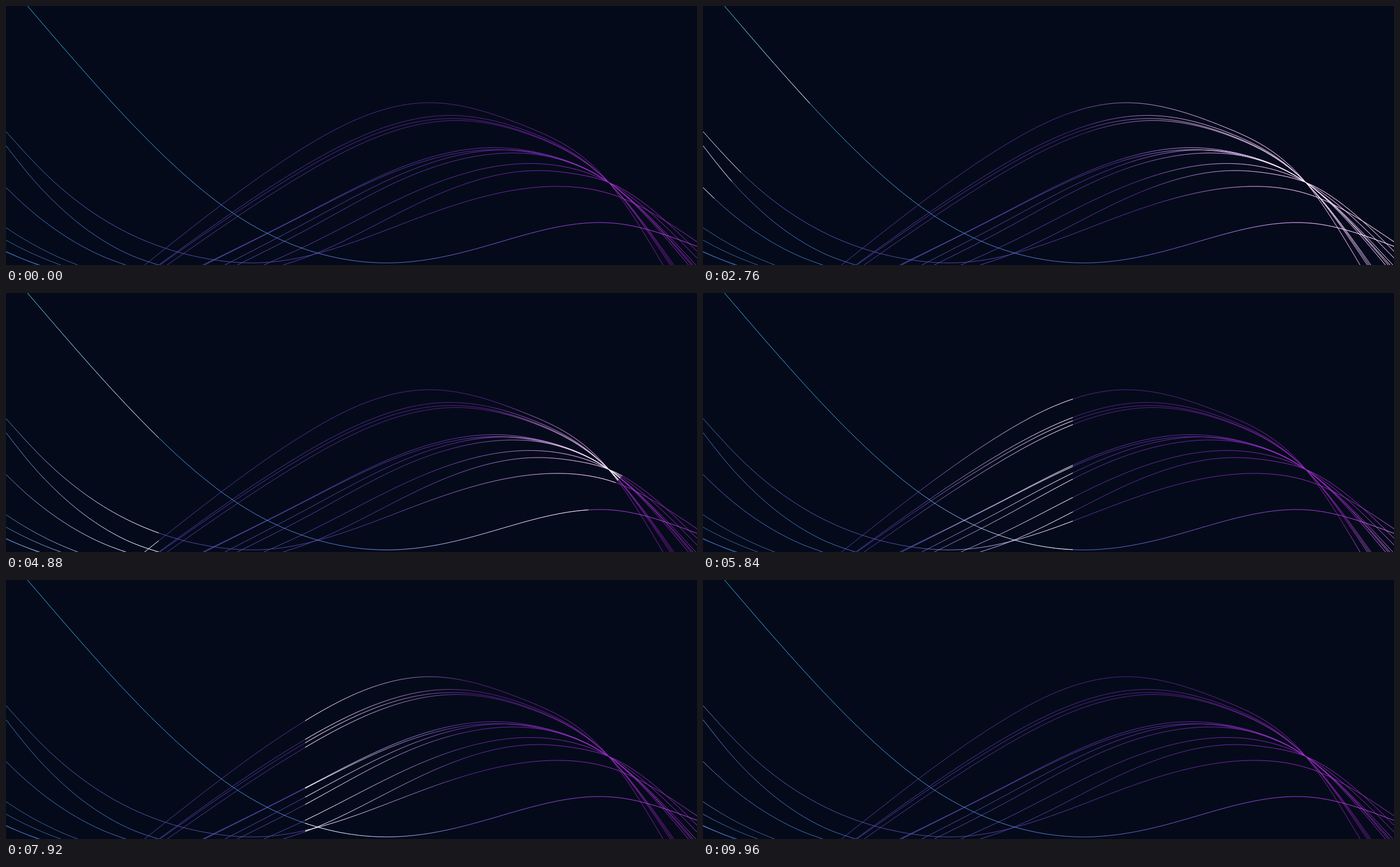
Write an HTML page that moves like this. It is 1222x458 px and loops after 10000 ms.

```html
<!DOCTYPE html>
<html lang="en">
<head>
<meta charset="utf-8">
<title>Light waves</title>
<style>
  html, body { margin: 0; width: 100%; height: 100%; overflow: hidden; background: #050a1a; }
  svg { display: block; width: 100%; height: 100%; }
  path { fill: none; stroke-width: 1; }
</style>
</head>
<body>
<svg id="stage" viewBox="0 0 1222 458" preserveAspectRatio="none"></svg>
<script>
const NS = 'http://www.w3.org/2000/svg';
const LOOP = 10000;
const W = 1222, H = 458;
const stage = document.getElementById('stage');

function add(parent, tag, attrs) {
  const el = document.createElementNS(NS, tag);
  for (const k in attrs) el.setAttribute(k, attrs[k]);
  parent.appendChild(el);
  return el;
}

// Natural cubic spline y(x) through points, written as Bezier segments
function spline(pts) {
  const n = pts.length - 1;
  const h = [], d = [], u = [0], z = [0], c = [];
  for (let i = 0; i < n; i++) {
    h[i] = pts[i + 1][0] - pts[i][0];
    d[i] = (pts[i + 1][1] - pts[i][1]) / h[i];
  }
  for (let i = 1; i < n; i++) {
    const l = 2 * (h[i - 1] + h[i]) - h[i - 1] * u[i - 1];
    u[i] = h[i] / l;
    z[i] = (6 * (d[i] - d[i - 1]) - h[i - 1] * z[i - 1]) / l;
  }
  c[n] = 0;
  for (let i = n - 1; i >= 0; i--) c[i] = i ? z[i] - u[i] * c[i + 1] : 0;

  let path = 'M' + pts[0];
  for (let i = 0; i < n; i++) {
    const [x0, y0] = pts[i], [x1, y1] = pts[i + 1], k = h[i] / 3;
    const m0 = d[i] - h[i] * (2 * c[i] + c[i + 1]) / 6;
    const m1 = d[i] + h[i] * (c[i] + 2 * c[i + 1]) / 6;
    path += 'C' + [x0 + k, y0 + m0 * k, x1 - k, y1 - m1 * k, x1, y1].map(v => v.toFixed(2));
  }
  return path;
}

// Rises from the floor, rounds its peak, falls through a pinch shared by all arches
const PINCH = [1066, 312];
function arch({ from, rise, shoulder, peak: [px, py], to }) {
  const run = (PINCH[0] - px) * 0.55;
  return [
    [from, H], [529, rise], [shoulder, shoulder - 380], [px, py],
    [px + run, py + 0.0014 * run * run], PINCH, [to, H]
  ];
}

// Power curve from the left edge down to the floor at x = exit, towards a hidden valley
function slope(top, exit, valley) {
  const fall = x => ((valley - x) / valley) ** 2.3;
  const r = fall(exit);
  const floor = (H - top * r) / (1 - r);
  return Array.from({ length: 7 }, (_, i) => {
    const x = exit * i / 6;
    return [x, floor - (floor - top) * fall(x)];
  });
}

const tall = [
  { from: 245, rise: 249, shoulder: 593, peak: [747, 171], to: 1162 },
  { from: 270, rise: 282, shoulder: 616, peak: [782, 193.5], to: 1175 },
  { from: 272, rise: 288, shoulder: 620, peak: [788, 199], to: 1178 },
  { from: 285, rise: 296, shoulder: 625, peak: [793, 202.5], to: 1181 }
].map(arch);

const low = [
  { from: 348, rise: 367.5, shoulder: 675, peak: [862, 250.5], to: 1207 },
  { from: 351, rise: 368.5, shoulder: 677, peak: [868, 254], to: 1212 },
  { from: 387, rise: 384, shoulder: 684, peak: [875, 254.5], to: 1215 },
  { from: 409, rise: 397, shoulder: 691, peak: [890, 260], to: 1220 },
  { from: 456, rise: 425, shoulder: 713, peak: [922, 278.5], to: 1234 },
  { from: 490, rise: 445, shoulder: 729, peak: [942, 291], to: 1246 }
].map(arch);

const left = [slope(247, 270, 380), slope(321, 212, 360)];
const corner = [slope(392, 127, 340), slope(414, 97, 320), slope(434, 57, 300), slope(435, 60, 300)];

const bright = [[38, 0], [270, 256], [404, 368], [555, 438], [690, 454], [814, 434], [1075, 384], [W, 425]];
const wave = [[0, 222], [60, 287], [180, 382], [351, 446], [450, 454], [553, 437], [747, 368], [980, 319], [1080, 336], [W, 417]];

const defs = add(stage, 'defs', {});
add(stage, 'rect', { width: W, height: H, fill: '#050a1a' });

function ramp(id, stops) {
  const g = add(defs, 'linearGradient', { id, gradientUnits: 'userSpaceOnUse', x1: 0, y1: 0, x2: W, y2: 0 });
  for (const [x, color] of stops) add(g, 'stop', { offset: x / W, 'stop-color': color });
}
ramp('cyan', [[0, '#2cbcee'], [180, '#30b2ea'], [400, '#4c94de'], [700, '#5a6cc8'], [1070, '#a03ede'], [W, '#c83cf0']]);
ramp('violet', [[0, '#4288d4'], [330, '#5a5cc0'], [750, '#6636b0'], [900, '#7a2cb8'], [1060, '#a830d6'], [W, '#b030d8']]);
ramp('plum', [[230, '#5348b0'], [500, '#56389e'], [750, '#5a2590'], [900, '#6c2298'], [1060, '#9a2ac2'], [1180, '#8a1cae']]);
ramp('blue', [[0, '#3f80cc'], [270, '#4a74c2']]);

let all = '';
function draw(lines, ink, opacity) {
  for (const line of lines) {
    const d = spline(line);
    all += d;
    add(stage, 'path', { d, stroke: `url(#${ink})`, 'stroke-opacity': opacity });
  }
}
draw(tall, 'plum', 0.9);
draw([...low, wave], 'violet', 0.85);
draw(left, 'blue', 0.95);
draw(corner, 'blue', 0.8);
draw([bright], 'cyan', 1);

// Each light sweep travels along (a, b); its sharp edge is a*x + b*y = at + speed * (t - t0)
const sweeps = [
  { a: 1, b: -1, at: 380, t0: 1840, speed: 0.463, tail: 360 },
  { a: 1, b: 1, at: 797, t0: 3640, speed: 0.497, tail: 360 },
  { a: 1, b: 0, at: 270, t0: 4880, speed: 0.4, tail: 290 },
  { a: -1, b: 0, at: -529, t0: 7920, speed: 0.38, tail: 290 }
];

sweeps.forEach((s, i) => {
  s.el = add(defs, 'linearGradient', { id: 'sweep' + i, gradientUnits: 'userSpaceOnUse' });
  for (const [offset, alpha] of [[0, 0], [1, 1], [1, 0]])
    add(s.el, 'stop', { offset, 'stop-color': '#fff', 'stop-opacity': alpha });
  add(stage, 'path', { d: all, stroke: `url(#sweep${i})` });
});

function render(t) {
  for (const { el, a, b, at, t0, speed, tail } of sweeps) {
    const front = at + speed * (t - t0);
    const n = a * a + b * b;
    [front - tail, front].forEach((v, i) => {
      el.setAttribute('x' + (i + 1), v * a / n);
      el.setAttribute('y' + (i + 1), v * b / n);
    });
  }
}

const start = performance.now();
function tick() {
  render((performance.now() - start) % LOOP);
  requestAnimationFrame(tick);
}
tick();
</script>
</body>
</html>
```
